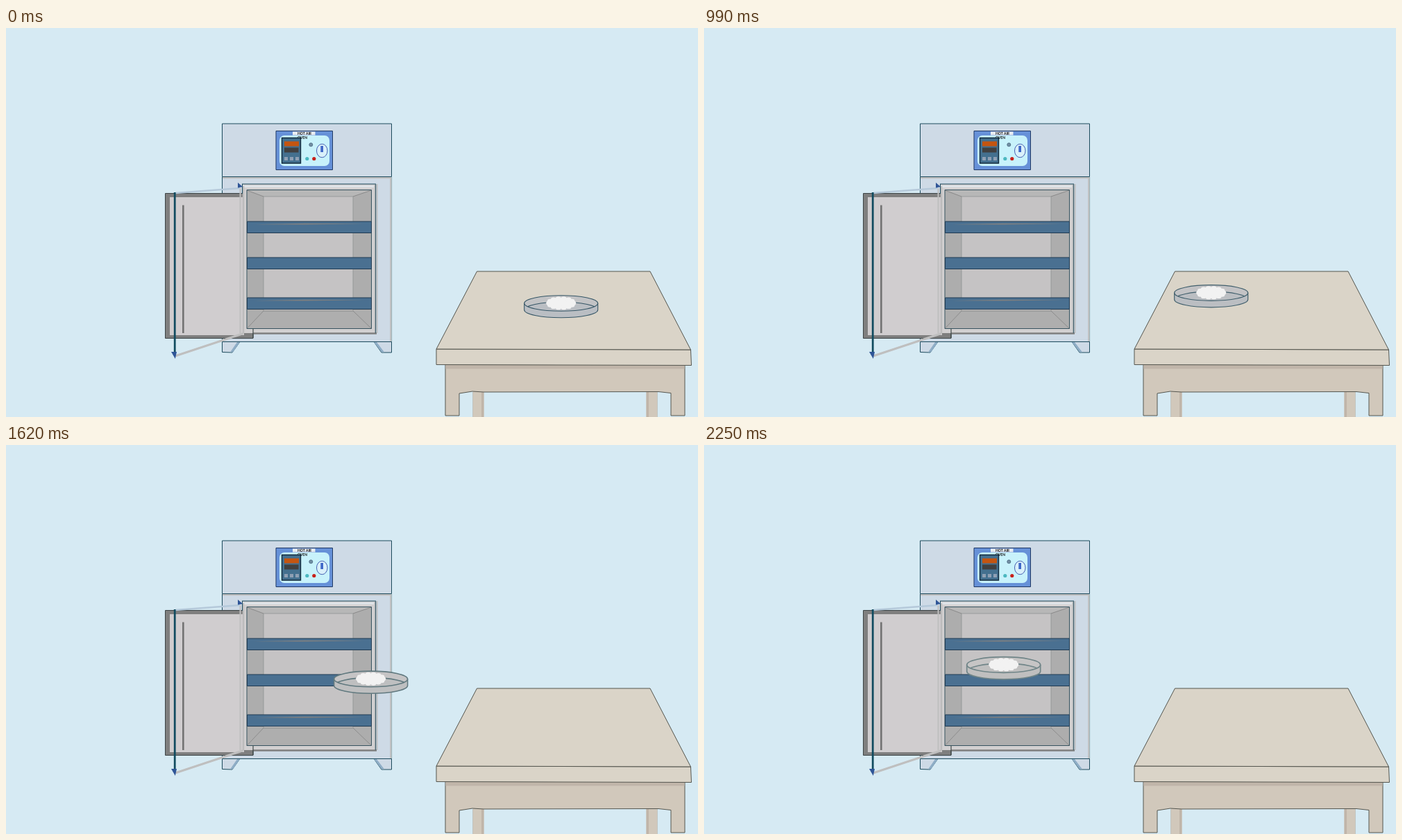
Write an HTML page with a canvas that moves like this. It is 997 px wide and 561 px high and loops after 2730 ms.

```html
<!DOCTYPE html>
<html lang="en">
<head>
<meta charset="utf-8">
<title>Hot air oven</title>
<style>
html, body { margin: 0; width: 100%; height: 100%; overflow: hidden; background: #d6eaf3; }
canvas { display: block; }
</style>
</head>
<body>
<canvas id="stage" width="997" height="561"></canvas>
<script>
const ctx = document.getElementById('stage').getContext('2d');
const LOOP = 2730, STEP = 30, STEPS = 60, REST = 450;
const TEAL = '#1c4a5c', GREY = '#7f7f7f', PALE = '#bfbfbf';

function paint(fill, stroke, width = 1) {
  if (fill) { ctx.fillStyle = fill; ctx.fill(); }
  if (stroke) { ctx.strokeStyle = stroke; ctx.lineWidth = width; ctx.stroke(); }
}
function box(x1, y1, x2, y2, fill, stroke, width) {
  ctx.beginPath();
  ctx.rect(x1, y1, x2 - x1, y2 - y1);
  paint(fill, stroke, width);
}
function poly(points, fill, stroke, width) {
  ctx.beginPath();
  for (let i = 0; i < points.length; i += 2) ctx.lineTo(points[i], points[i + 1]);
  ctx.closePath();
  paint(fill, stroke, width);
}
function line(x1, y1, x2, y2, color, width = 1) {
  ctx.beginPath();
  ctx.moveTo(x1, y1);
  ctx.lineTo(x2, y2);
  paint(null, color, width);
}
function oval(x, y, rx, ry, fill, stroke, width) {
  ctx.beginPath();
  ctx.ellipse(x, y, rx, ry, 0, 0, Math.PI * 2);
  paint(fill, stroke, width);
}

function cabinet() {
  const skin = '#cedae6';
  box(311.5, 215, 555.5, 452.5, skin);
  line(311.5, 215, 311.5, 452, TEAL);
  line(312, 216, 555, 216, PALE, 2.5);
  line(554.5, 215, 554.5, 452, PALE, 2.5);
  line(555.7, 215, 555.7, 452, '#7fa3ac', 0.6);
  poly([311.5, 452.5, 337, 452.5, 326, 468, 311.5, 467.5], skin, TEAL);
  poly([530, 452.5, 555.5, 452.5, 555.5, 468, 541, 468], skin, TEAL);
  poly([333, 453, 337, 453, 327, 467.5, 323, 467.5], '#8eadc6');
  poly([530, 453, 534, 453, 545, 467.5, 541, 467.5], '#8eadc6');
  line(311.5, 452.5, 555.5, 452.5, TEAL);
  box(311.5, 138, 555.5, 214.5, skin, TEAL);
}

function label(text, x, y) {
  ctx.fillStyle = '#111';
  ctx.font = 'bold 5px Lato, sans-serif';
  ctx.textAlign = 'center';
  ctx.fillText(text, x, y);
}

function panel() {
  box(389, 148.5, 470.5, 204.5, '#6691d8', '#1f3864');
  ctx.beginPath();
  ctx.roundRect(394, 155, 72, 44, 7);
  paint('#c8f2fb');
  box(413, 149.5, 445.5, 154.5, '#e9edf2');
  label('HOT AIR', 430, 153.7);
  label('OVEN', 427, 160);
  box(397.5, 158.5, 424.5, 195, '#44708f', '#10293b', 1.4);
  box(401, 163.5, 422, 170.5, '#c45510');
  box(401, 172.5, 421.5, 179.5, '#404040');
  for (let i = 0; i < 3; i++) box(401 + i * 8, 186, 406 + i * 8, 191, '#8fa0b4');
  oval(439.3, 168.3, 2.5, 2.5, '#7391a5', '#44627c', 0.8);
  oval(433.8, 188.5, 2.6, 2.6, '#4bb8c0');
  oval(443.8, 188.5, 2.6, 2.6, '#c8201a');
  oval(455.3, 177, 7.8, 9.7, '#d9f0fa', '#4560b0', 1);
  box(453.3, 170, 457, 179, '#3f68c8');
}

function door() {
  box(229.5, 238.5, 356, 447.5, GREY, '#3c4446');
  box(236, 244, 343, 443, '#d0cdcf');
  line(255.3, 255.5, 255.3, 440, '#737373', 2.6);
}

function chamber() {
  box(341, 225, 533, 440, '#d2d0d1');
  line(340, 225, 533, 225, TEAL, 1.2);
  line(340, 228.5, 530, 228.5, '#dfe4e8', 3);
  line(356, 440.5, 534, 440.5, GREY, 2.6);
  line(532.5, 225, 532.5, 440, '#4b6670', 1.6);
  line(534.8, 225, 534.8, 440, PALE, 1.5);
  line(356, 433, 356, 447, '#404848', 1.2);

  box(347, 233.5, 526.5, 433.5, '#adadad');
  poly([347, 234, 526.5, 234, 500, 243, 371, 243], '#b7b7b7');
  box(371, 243, 500, 408, '#c5c3c4', '#8f9494', 0.8);
  poly([371, 408, 500, 408, 526.5, 433.5, 347, 433.5], '#aeaeae', '#858585', 0.8);
  line(347, 234, 371, 243, GREY, 0.8);
  line(526.5, 234, 500, 243, GREY, 0.8);
  box(347, 233.5, 526.5, 433.5, null, '#36535f');
  for (const y of [279, 331, 389]) {
    box(347.5, y, 526.5, y + 16.5, '#4a7091', '#1f3a52');
    if (y !== 331) poly([357, y + 4.2, 430, y + 2.7, 517, y + 3.2, 430, y + 4.6], GREY);
  }

  line(337.5, 231, 337.5, 440, PALE, 2);
  line(342, 228, 342, 440, '#bcbcbc', 2.5);
  line(340.5, 225, 340.5, 239, TEAL);
}

function hinges() {
  line(244, 238, 337, 231, '#b5c9da', 2.6);
  poly([334, 223, 341, 229, 334, 230.5], '#2f5597');
  line(244, 473, 342, 440.5, PALE, 3);
  line(243.2, 237, 243.2, 470, '#124c60', 2.8);
  poly([238, 467, 246, 467, 243.8, 477], '#2f5597');
}

function table() {
  const edge = '#55564f', top = '#dad4c8', side = '#d1c8bb', shade = '#c0b5a9';
  box(673, 524, 688.5, 561, side);
  box(685, 524, 688.5, 561, shade);
  box(922.5, 524, 938, 561, side);
  box(922.5, 524, 926, 561, shade);
  line(672.5, 525, 672.5, 561, '#b3aaa0', 0.6);
  line(938.5, 525, 938.5, 561, '#b3aaa0', 0.6);
  poly([633, 485, 978, 486, 978, 559, 958, 559, 958, 526.5, 940, 524.5,
    688, 525, 672, 524, 653, 527, 653, 559, 633, 559], side, edge);
  box(633.5, 486, 977.5, 491.5, shade);
  poly([620, 463, 986.5, 464, 987.5, 486.5, 620, 485.5], top, edge);
  poly([678.5, 351, 928, 351, 986.5, 464, 620, 463], top, edge);
}

const mix = (a, b, p) => `rgb(${a.map((v, i) => Math.round(v + (b[i] - v) * p))})`;

function cotton(x, y) {
  oval(x, y, 19, 8, '#f2f2f2');
  for (let i = 0; i < 14; i++) {
    const a = i * Math.PI / 7;
    oval(x + 17.5 * Math.cos(a), y + 6.5 * Math.sin(a), 4, 3.2, '#f2f2f2');
  }
}

function dish(x, y, p) {
  const stroke = mix([54, 86, 102], [112, 133, 136], p);
  const fill = mix([186, 190, 195], [191, 191, 191], p);
  const rim = mix([194, 195, 197], [198, 197, 197], p);
  const width = 1.1 + 0.6 * p;
  const rx = 53, ry = 11.3, low = y + 9.5;
  ctx.beginPath();
  ctx.moveTo(x - rx, y);
  ctx.lineTo(x - rx, low);
  ctx.ellipse(x, low, rx, ry, 0, Math.PI, 0, true);
  ctx.lineTo(x + rx, y);
  paint(fill, stroke, width);
  oval(x, y, rx, ry, rim);
  ctx.save();
  ctx.beginPath();
  ctx.ellipse(x, y, rx, ry, 0, 0, Math.PI * 2);
  ctx.clip();
  oval(x, low, rx, ry, fill, stroke, width);
  ctx.restore();
  oval(x, y, rx, ry, null, stroke, width);
  cotton(x, y - 0.2);
}

// Constant acceleration, cruise, constant braking.
function ramp(u, a = 0.4) {
  const k = 2 * a * (1 - a);
  if (u < a) return u * u / k;
  if (u > 1 - a) return 1 - (1 - u) ** 2 / k;
  return (u - a / 2) / (1 - a);
}

function draw(now) {
  const t = now % LOOP;
  const step = Math.min(STEPS, Math.max(0, Math.floor((t - REST) / STEP + 1e-6)));
  const p = ramp(step / STEPS);
  ctx.fillStyle = '#d6eaf3';
  ctx.fillRect(0, 0, 997, 561);
  cabinet();
  panel();
  door();
  chamber();
  hinges();
  table();
  dish(799.7 - 368 * p, 397 - 80 * p, p);
}

function tick() {
  draw(performance.now());
  requestAnimationFrame(tick);
}
tick();
</script>
</body>
</html>
```
